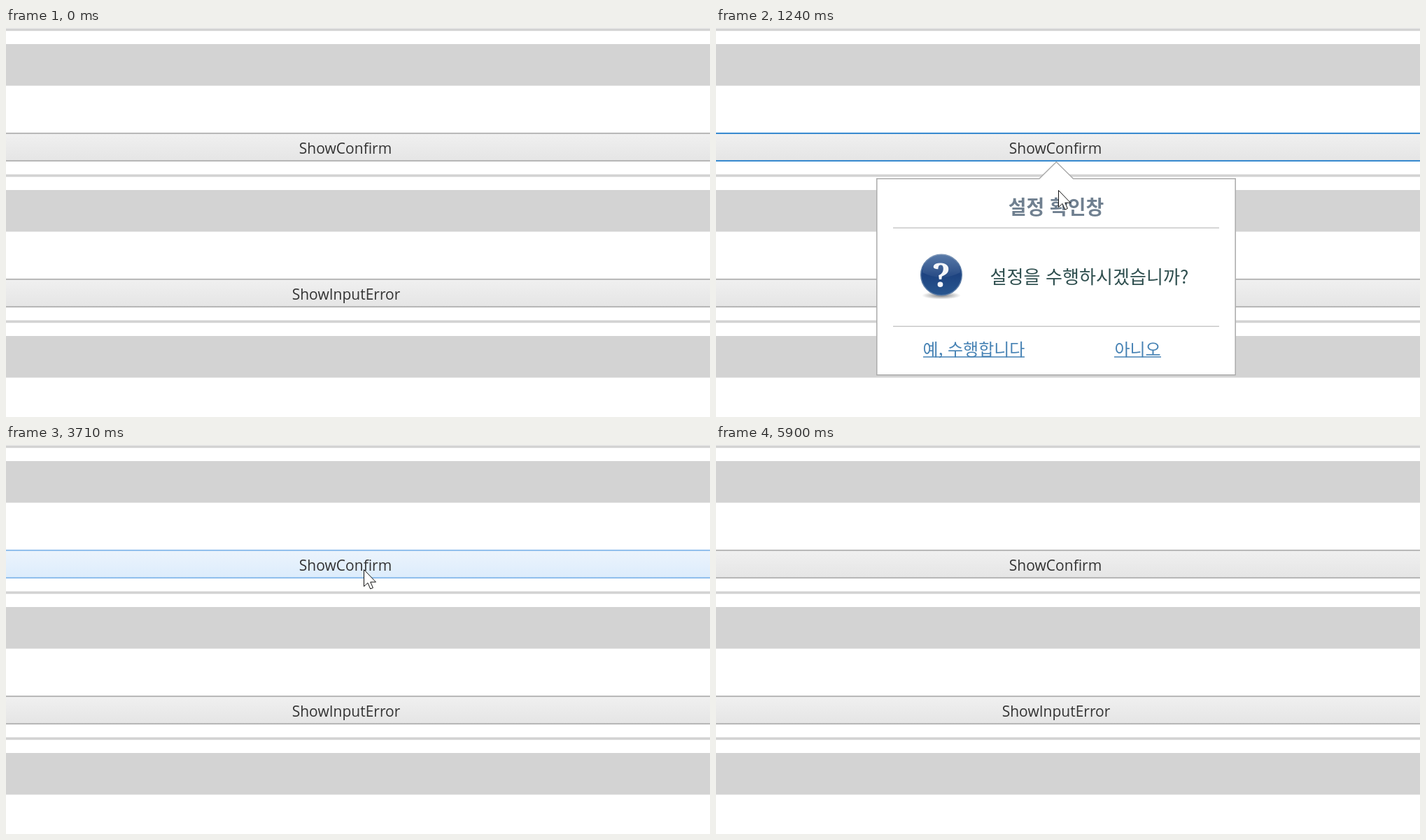
Write an HTML page that moves like this. It is 1006 px wide and 557 px high and loops after 6.29 s.

```html
<!DOCTYPE html>
<html lang="ko">
<head>
<meta charset="utf-8">
<title>Confirm popup</title>
<style>
  html, body { margin: 0; width: 100%; height: 100%; overflow: hidden; background: #fff; }
  svg { display: block; width: 1006px; height: 557px; }
  text { text-anchor: middle; }
  .label { font: 21px "Open Sans", "Noto Sans", sans-serif; fill: #333; }
  .popup text { font-family: "Noto Sans CJK KR", "Noto Sans CJK", "Noto Sans CJK JP", sans-serif; font-weight: 350; }
  .popup .title { font-size: 28px; font-weight: bold; fill: #708090; }
  .popup .mark { font: bold 47px "Noto Serif", serif; fill: #f4f6fa; }
  .link { fill: #4682b4; stroke: #4682b4; }
  .link text { font-size: 24px; stroke: none; }
  .link line { stroke-width: 1.5; }
  .link.over { fill: #ffa500; stroke: #ffa500; }
  .link.over text { font-weight: bold; }
</style>
</head>
<body>
<svg viewBox="0 0 1006 557">
  <defs>
    <linearGradient id="normal" x2="0" y2="1"><stop stop-color="#f0f0f0"/><stop offset="1" stop-color="#e5e5e5"/></linearGradient>
    <linearGradient id="hover" x2="0" y2="1"><stop stop-color="#ecf4fc"/><stop offset="1" stop-color="#dcecfc"/></linearGradient>
    <linearGradient id="pressed" x2="0" y2="1"><stop stop-color="#daecfc"/><stop offset="1" stop-color="#c4e0fc"/></linearGradient>
    <linearGradient id="ball" x2="0" y2="1"><stop stop-color="#2b5590"/><stop offset=".5" stop-color="#1d4380"/><stop offset="1" stop-color="#28568f"/></linearGradient>
    <linearGradient id="gloss" x2="0" y2="1"><stop stop-color="#fff" stop-opacity=".22"/><stop offset="1" stop-color="#fff" stop-opacity=".05"/></linearGradient>
    <radialGradient id="shadow"><stop stop-opacity=".5"/><stop offset="1" stop-opacity="0"/></radialGradient>
  </defs>

  <g id="bars" fill="#d3d3d3"></g>

  <g id="confirm">
    <rect x="-5" y="150.75" width="1016" height="39.5" stroke-width="1.7"/>
    <text class="label" x="485" y="179.5">ShowConfirm</text>
  </g>
  <g id="error">
    <rect x="-5" y="359.75" width="1016" height="39.5" stroke-width="1.7"/>
    <text class="label" x="486" y="388.5">ShowInputError</text>
  </g>

  <g id="popup" class="popup">
    <path d="M229.8 215.8H462L486.3 191.8L510.5 215.8H742.2V496.8H229.8Z" fill="#fff" stroke="#ababab" stroke-width="1.5"/>
    <path d="M253 286.3H719M253 427.3H719" stroke="#c9c9c9" stroke-width="1.5"/>
    <text class="title" x="486" y="267">설정 확인창</text>
    <ellipse cx="322" cy="383" rx="28" ry="5.5" fill="url(#shadow)"/>
    <circle cx="322" cy="353.5" r="29.3" fill="url(#ball)" stroke="#5c7ca6" stroke-width="1.5"/>
    <path d="M295 350A27 27 0 0 1 349 350Q322 364 295 350Z" fill="url(#gloss)"/>
    <text class="mark" x="322" y="371">?</text>
    <text x="533.5" y="366" font-size="26.1" fill="#2f4f4f">설정을 수행하시겠습니까?</text>
    <g id="yes" class="link"><text x="368.5" y="468.5">예, 수행합니다</text><line x1="296" x2="441" y1="471" y2="471"/></g>
    <g id="no" class="link"><text x="602.5" y="468.5">아니오</text><line x1="569" x2="636" y1="471" y2="471"/></g>
  </g>

  <g id="cursor" fill="#fff" stroke="#111" stroke-linejoin="round">
    <path id="arrow" d="M.5 .5V24.5L6 19.5L9.7 28L13.4 26.5L9.8 18.2H17.5Z"/>
    <path id="hand" d="M-2.5 21V2.5a2.7 2.7 0 0 1 5.4 0V17V12q4-1.5 4.6 1.5V18V13.5q4-1 4.3 1.5q3-.5 3.2 2V24q0 9.5-9 9.5H3q-5 0-8-6l-4.5-7.5q0-4 4-2.5Z"/>
  </g>
</svg>
<script>
const LOOP = 6290, FLY_IN = 400, FADE_OUT = 300;
const $ = id => document.getElementById(id);
const clamp = v => Math.max(0, Math.min(1, v));
const smooth = k => k * k * (3 - 2 * k);
const between = (v, a, b) => v >= a && v < b;

// The popup appears shortly after the button press and leaves after a link click.
const visit = (press, click) => ({ press, click, show: press + 90, hide: click + 110 });
const visits = [visit(694, 2005), visit(3713, 4555)];

// The pointer rests at each stop until it eases to the next one.
const move = (from, to, x, y) => ({ from, to, x, y });
const entry = { x: 800, y: 530 }, enterTime = 70, leaveTime = 5860;
const moves = [
  move(70, 530, 507, 179),
  move(1000, 1900, 404, 477),
  move(2560, 3030, 310, 414),
  move(3170, 3710, 511, 178),
  move(3900, 4180, 656, 434),
  move(4180, 4480, 620, 473),
  move(5340, 5660, 484, 420),
  move(5660, leaveTime, 455, 557)
];

for (let y = 0; y < 557; y += 209) {
  $("bars").innerHTML += `<rect y="${y + .5}" width="1006" height="3.7"/><rect y="${y + 23}" width="1006" height="59.6"/>`;
}

function pointerAt(t) {
  if (!between(t, enterTime, leaveTime)) return null;
  let { x, y } = entry;
  for (const m of moves) {
    const k = smooth(clamp((t - m.from) / (m.to - m.from)));
    x += (m.x - x) * k;
    y += (m.y - y) * k;
  }
  return { x: Math.round(x), y: Math.round(y) };
}

function paintButton(id, state, focused) {
  const border = { normal: "#acacac", hover: "#7eb4ea", pressed: "#569de5" }[state];
  const rect = $(id).firstElementChild;
  rect.setAttribute("fill", `url(#${state})`);
  rect.setAttribute("stroke", focused ? "#0f74c8" : border);
}

function render(t) {
  const open = visits.find(v => between(t, v.show, v.hide + FADE_OUT));
  const entered = open ? clamp((t - open.show) / FLY_IN) : 0;
  const opacity = open ? entered * (1 - clamp((t - open.hide) / FADE_OUT)) : 0;
  const away = entered - 1;
  $("popup").setAttribute("opacity", opacity);
  $("popup").setAttribute("transform", `translate(${away * 513} ${away * 41})`);

  const at = pointerAt(t);
  const inside = (x0, x1, y0, y1) => !!at && between(at.x, x0, x1) && between(at.y, y0, y1);
  const overYes = opacity > 0 && inside(296, 442, 446, 481);
  const overNo = opacity > 0 && inside(569, 636, 446, 481);
  $("yes").classList.toggle("over", overYes);
  $("no").classList.toggle("over", overNo);

  const pressed = visits.some(v => between(t, v.press, v.show));
  const focused = visits.some(v => between(t, v.press, v.click));
  const overConfirm = inside(0, 1006, 150, 191);
  const overError = !open && inside(0, 1006, 359, 400);
  paintButton("confirm", pressed ? "pressed" : overConfirm ? "hover" : "normal", focused);
  paintButton("error", overError ? "hover" : "normal", false);

  const pointing = overYes || overNo;
  $("cursor").style.display = at ? "" : "none";
  $("arrow").style.display = pointing ? "none" : "";
  $("hand").style.display = pointing ? "" : "none";
  if (at) $("cursor").setAttribute("transform", `translate(${at.x} ${at.y})`);
}

const start = performance.now();
function tick() {
  render((performance.now() - start) % LOOP);
  requestAnimationFrame(tick);
}
tick();
</script>
</body>
</html>
```
